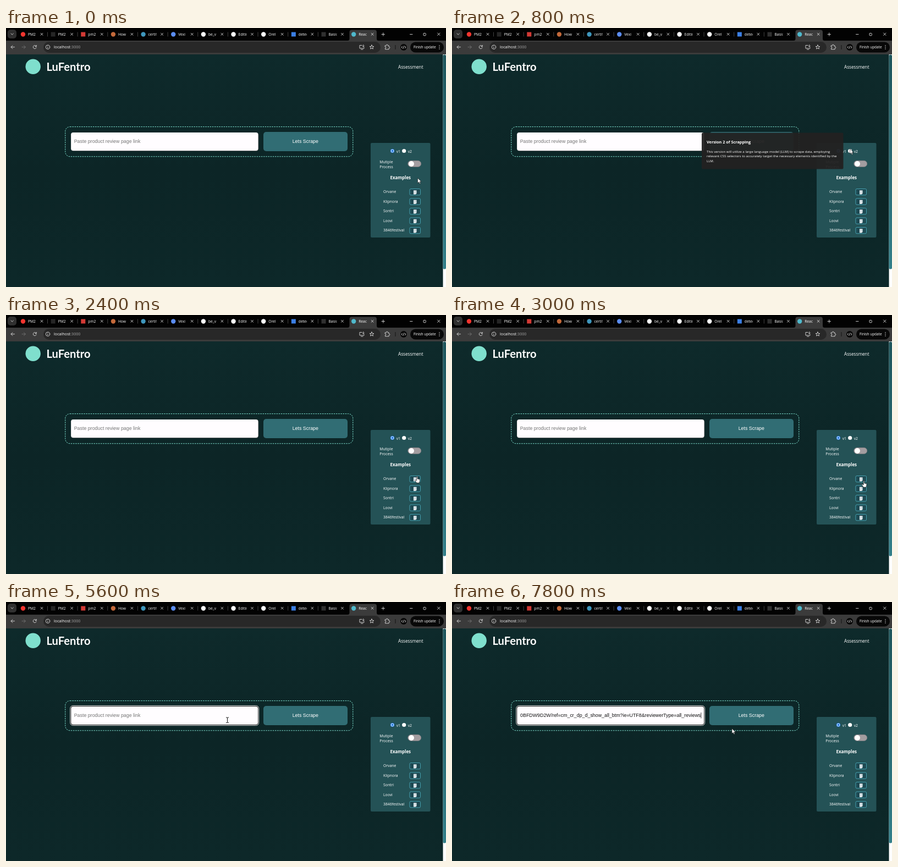
Write an HTML page that moves like this. It is 800 px wide and 471 px high and loops after 8 s.

```html
<!DOCTYPE html>
<html lang="en">
<head>
<meta charset="utf-8">
<title>Review scraper</title>
<style>
html, body { margin: 0; width: 100%; height: 100%; overflow: hidden; background: #0d2728; }
svg { display: block; width: 100%; height: 100%; }
text { font-family: "Open Sans", "Noto Sans", sans-serif; font-weight: 500; fill: #fff; white-space: pre; }
.form { font: 8.87px "Liberation Sans", Arial, sans-serif; }
.small { font-size: 6.85px; }
.bold { font-weight: 700; }
.line { fill: none; stroke: #e6e6e6; stroke-width: .85; stroke-linecap: round; stroke-linejoin: round; }
</style>
</head>
<body>
<svg viewBox="0 0 800 471" preserveAspectRatio="none">
  <defs>
    <linearGradient id="page" x2="0" y2="1">
      <stop offset="0" stop-color="#0e2a2b"/><stop offset=".5" stop-color="#0c2526"/><stop offset="1" stop-color="#0d2829"/>
    </linearGradient>
    <linearGradient id="thumb" x2="0" y2="1">
      <stop offset="0" stop-color="#1f565c"/><stop offset="1" stop-color="#34808a"/>
    </linearGradient>
    <clipPath id="field"><rect x="123" y="192" width="331" height="30"/></clipPath>
  </defs>

  <!-- browser -->
  <rect width="800" height="24" fill="#020202"/>
  <rect y="23" width="800" height="25" fill="#3b3b3b"/>
  <path d="M621 23q3.500 0 3.500-3.500V7.500q0-4 4-4h41.500q4 0 4 4v12q0 3.500 3.500 3.500z" fill="#3b3b3b"/>
  <rect x="3" y="3" width="16" height="16" rx="5" fill="#303030"/>
  <path class="line" d="M9 10l2.200 2.200L13.400 10"/>
  <g id="tabs"></g>
  <path class="line" d="M683 11.500h5.500M685.800 8.800v5.500M734.500 11.500h4.500M784.500 9l4.500 4.500M789 9l-4.500 4.500"/>
  <rect class="line" x="759" y="9.500" width="4.300" height="4.300" rx="1"/>
  <rect x="68" y="25" width="613" height="20" rx="10" fill="#282828"/>
  <path class="line" d="M15.500 34.700H9.200M12 31.800l-2.900 2.900 2.900 2.900"/>
  <path class="line" style="stroke:#777" d="M29 34.700h6.300M32.500 31.800l2.900 2.900-2.900 2.900"/>
  <path class="line" d="M55 33.300a3 3 0 1 0 .2 2.200M55.300 31.300v2.200h-2.200"/>
  <circle cx="76" cy="34.700" r="3.700" class="line"/>
  <path class="line" d="M76 34.500v2M76 32.700v.1"/>
  <text x="87" y="37.300" font-size="7.200">localhost<tspan fill="#a2a2a2">:3000</tspan></text>
  <path class="line" d="M647 31.500h-4v5.500h8v-1.500M645.500 39h3.500M649.800 30.500v3.500M648.200 32.700l1.600 1.600 1.600-1.600"/>
  <path class="line" d="M665 30.900l1.100 2.500 2.700.2-2.100 1.800.7 2.700-2.400-1.500-2.400 1.500.7-2.700-2.100-1.800 2.700-.2z"/>
  <path class="line" d="M689.500 32h2v-.5a1.300 1.300 0 0 1 2.600 0v.5h2v2.200h.4a1.300 1.300 0 0 1 0 2.600h-.4v2h-6.600v-2.200a1.300 1.300 0 0 0 0-2.600z"/>
  <path d="M708 31v8" stroke="#151515"/>
  <circle cx="723" cy="35" r="6" fill="#080808"/>
  <path class="line" d="M720.700 33.300l-1.800 1.700 1.800 1.700M725.300 33.300l1.800 1.700-1.800 1.700M723.700 32.800l-1.400 4.400"/>
  <rect x="735" y="25.500" width="61" height="19" rx="9.500" fill="#080808"/>
  <text x="741" y="37.300" font-size="6.450">Finish update</text>
  <path d="M788 32v.1M788 35v.1M788 38v.1" class="line" style="stroke-width:1.500"/>

  <!-- page -->
  <rect y="48" width="800" height="423" fill="url(#page)"/>
  <rect x="794.500" y="48" width="5.500" height="423" fill="#fff"/>
  <rect x="794.500" y="48.500" width="5.500" height="390" rx="2.500" fill="url(#thumb)"/>
  <circle cx="49.200" cy="70.300" r="13.700" fill="#7fdfcd"/>
  <text x="73.500" y="78" style="font:700 20.200px Lato,sans-serif">LuFentro</text>
  <text x="713" y="74" font-size="8.200">Assessment</text>

  <!-- form -->
  <rect x="107.800" y="179.600" width="523" height="54.200" rx="8.500" fill="none" stroke="#82e6d5" stroke-dasharray="2.500 1.670"/>
  <rect x="118" y="190" width="341.200" height="33.800" rx="4.500" fill="#6b6b6b"/>
  <rect x="118.200" y="190" width="340.200" height="33" rx="4" fill="#fffdff"/>
  <g id="focus">
    <rect x="116.800" y="188.500" width="342.800" height="36" rx="5" fill="#080c0c" stroke="#fff" stroke-width=".9"/>
    <rect x="118.300" y="190" width="339.900" height="33.100" rx="4" fill="#fffdff"/>
  </g>
  <text id="hint" class="form" x="123.700" y="209.400" style="fill:#757575">Paste product review page link</text>
  <g id="pasted" clip-path="url(#field)">
    <text class="form" x="452.300" y="209.400" text-anchor="end" style="fill:#111">0BFDW9D2W/ref=cm_cr_dp_d_show_all_btm?ie=UTF8&amp;reviewerType=all_reviews</text>
    <path id="caret" d="M452.800 201v10.500" stroke="#111" stroke-width=".8"/>
  </g>
  <rect x="468" y="189" width="153" height="35" rx="5" fill="#316d74"/>
  <text class="form" x="544.300" y="209.400" text-anchor="middle">Lets Scrape</text>

  <!-- side panel -->
  <rect x="663" y="209" width="108.500" height="172" rx="2" fill="#245256"/>
  <circle cx="702.500" cy="223.500" r="3.300" fill="#fff" stroke="#1673e0"/>
  <circle cx="702.500" cy="223.500" r="1.900" fill="#1673e0"/>
  <circle cx="723.700" cy="223.500" r="3.600" fill="#fff"/>
  <g class="small">
    <text x="709.700" y="226.500">v1</text>
    <text x="730.700" y="226.500">v2</text>
    <text x="679.300" y="245.500">Mutiple</text>
    <text x="679.300" y="255">Process</text>
  </g>
  <rect x="730.700" y="241.300" width="24" height="11.200" rx="5.600" fill="#a39da0" stroke="#817c80" stroke-width=".7"/>
  <circle cx="737" cy="247" r="4.900" fill="#fff"/>
  <text class="bold" x="717.300" y="274.500" text-anchor="middle" font-size="7.900">Examples</text>
  <g id="examples"></g>

  <g id="tooltip">
    <rect x="454" y="190.500" width="257.500" height="66" rx="2" fill="#222121" fill-opacity=".95"/>
    <text class="bold" x="463" y="210.300" font-size="7.290">Version 2 of Scrapping</text>
    <g font-size="6.150">
      <text x="463" y="226.700">This version will utilize a large language model (LLM) to scrape data, employing</text>
      <text x="463" y="235.200">relevant CSS selectors to accurately target the necessary elements identified by the</text>
      <text x="463" y="243.700">LLM.</text>
    </g>
  </g>

  <g id="pointer">
    <path id="arrow" d="M0 0v9l2.200-2 1.500 3.300 1.500-.7-1.500-3.200h2.900z" fill="#fff" stroke="#111" stroke-width=".6"/>
    <path id="hand" d="M-.9.400q.9-1.100 1.700 0v4q3.900 0 4.200 1.800 0 3.400-1.200 5.500H-1Q-2.300 9.400-4 7.100q.3-1.400 1.600-.6l1.500 1z" fill="#fff" stroke="#111" stroke-width=".7"/>
    <path id="beam" d="M-2.500-4.500h1.700q.8 0 .8.800.1-.8.900-.8h1.700M0-4v8.500M-2.500 5h1.700Q0 5 0 4.200q.1.800.9.800h1.700" fill="none" stroke="#111"/>
  </g>
</svg>
<script>
const LOOP = 8000, STEP = 200;
const byId = id => document.getElementById(id);
const show = (id, visible) => byId(id).style.display = visible ? "" : "none";

const tabs = [
  ["PM2", "#f3352f"], ["PM2", "#262626", 1], ["pm2", "#d33a35", 1], ["How", "#c4693a"],
  ["certif", "#3f97bd"], ["Vexi", "#5b8df2"], ["be_v", "#fff"], ["Editin", "#fff"],
  ["Orel", "#fff"], ["detec", "#3b7fe4", 1], ["Basic", "#303030", 1], ["Reac", "#4fb9cc"]
];
byId("tabs").innerHTML = tabs.map(([label, color, square], i) => {
  const x = 31 + i * 54.65, clip = `tab${i}`;
  const icon = square
    ? `<rect x="${x - 4}" y="7.500" width="8" height="8" fill="${color}"/>`
    : `<circle cx="${x}" cy="11.500" r="4.200" fill="${color}"/>`;
  const divider = i < 10 ? `<path d="M${x + 44.5} 7.500v8" stroke="#555" stroke-width=".8"/>` : "";
  return `<clipPath id="${clip}"><rect x="${x + 8}" y="4" width="16" height="16"/></clipPath>${icon}
    <text x="${x + 9}" y="14.200" font-size="6.700" clip-path="url(#${clip})">${label}</text>
    <path class="line" d="M${x + 32} 9.300l4 4m0-4l-4 4"/>${divider}`;
}).join("");

byId("examples").innerHTML = ["Orvane", "Klipnora", "Sontri", "Loovi", "3846festival"].map((name, i) => {
  const y = 298 + i * 17.5;
  return `<text class="small" x="686" y="${y + 2}">${name}</text>
    <rect x="734" y="${y - 5.5}" width="19.500" height="11.300" rx="2" fill="#1e4a53" stroke="#4aa9b8" stroke-width=".9"/>
    <path d="M741 ${y - 2.8}h5.500v5.500l-1.500 1.700h-4z" fill="#e6edf0"/>
    <path d="M742 ${y - 1}h3.300m-3.300 1.700h3.300m-3.300 1.700h2" stroke="#9db4bd" stroke-width=".6"/>`;
}).join("");

// time, x, y of the pointer's hot spot
const path = [
  [0, 748.5, 273], [600, 723.5, 220], [1000, 723.5, 220], [1600, 741.7, 262],
  [2600, 749, 301.5], [3600, 749, 301.5], [4400, 590.7, 280.3], [5200, 402.5, 214.5],
  [6200, 402.5, 214.5], [7600, 509, 230.3], [8000, 509, 230.3]
];

function pointerAt(t) {
  const i = path.findIndex((p, k) => k && t < p[0]);
  const [t0, x0, y0] = path[i - 1], [t1, x1, y1] = path[i];
  const u = (t - t0) / (t1 - t0);
  return [x0 + (x1 - x0) * u, y0 + (y1 - y0) * u];
}

const inside = (x, y, l, t, r, b) => x >= l && x <= r && y >= t && y <= b;

function draw(time) {
  const t = Math.floor(time / STEP) * STEP;
  const [x, y] = pointerAt(t);
  const overField = inside(x, y, 118, 190, 459, 224);
  const overButton = inside(x, y, 468, 189, 621, 224) ||
    (inside(x, y, 734, 292, 754, 374) && (y - 292.5) % 17.5 < 11.5);
  byId("pointer").setAttribute("transform", `translate(${x} ${y})`);
  show("beam", overField);
  show("hand", overButton);
  show("arrow", !overField && !overButton);
  show("tooltip", t >= 600 && t < 1200);
  show("focus", t >= 5400);
  show("hint", t < 6000);
  show("pasted", t >= 6000);
  show("caret", (t + 200) % 1000 < 500);
}

const start = performance.now();
function tick() {
  draw((performance.now() - start) % LOOP);
  requestAnimationFrame(tick);
}
tick();
</script>
</body>
</html>
```
